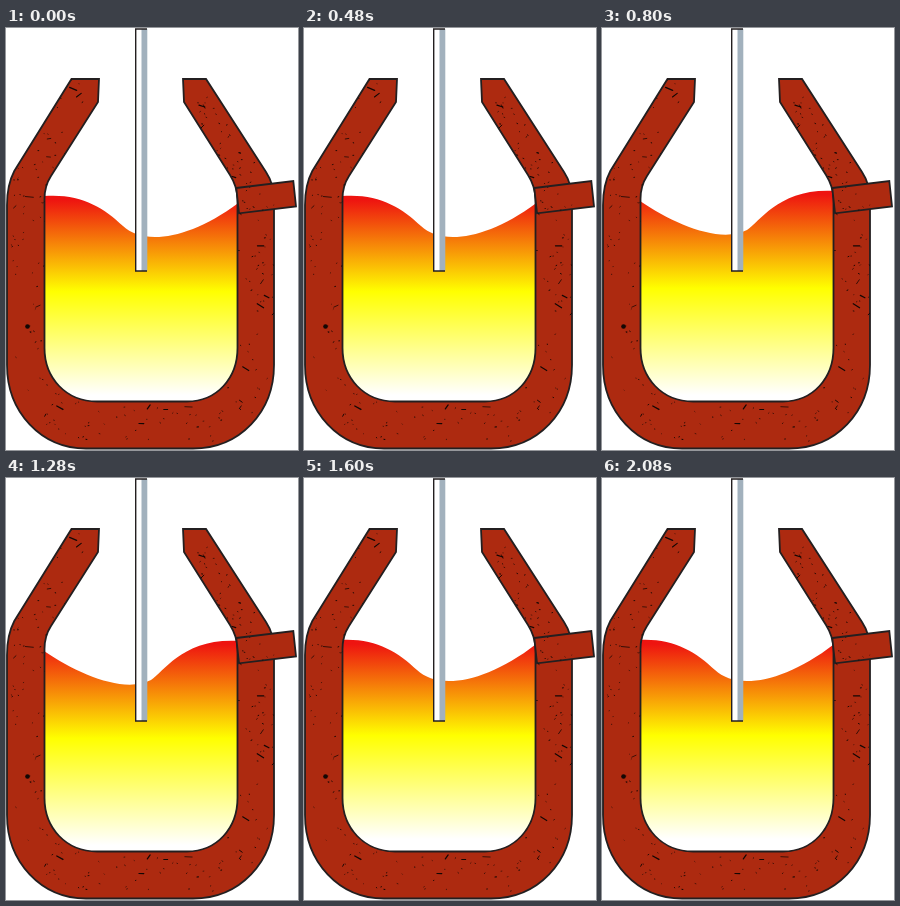
An HTML page that plays this animation: 292x422 px, repeating every 2400 ms.

```html
<!DOCTYPE html>
<html lang="en">
<head>
<meta charset="utf-8">
<title>Converter vessel</title>
<style>
  html, body { margin: 0; width: 100%; height: 100%; overflow: hidden; background: #fff; }
  svg { display: block; width: 100%; height: 100%; }
  .melt { visibility: hidden; animation: show 2400ms step-end infinite; }
  .melt:nth-child(2) { animation-delay: -1600ms; }
  .melt:nth-child(3) { animation-delay: -800ms; }
  @keyframes show {
    0% { visibility: visible; }
    33.3333%, 100% { visibility: hidden; }
  }
  .wall { fill: #ad2a10; stroke: #231f20; stroke-width: 1.8; }
  .grit { fill: none; stroke: #130704; stroke-linecap: round; }
</style>
</head>
<body>
<svg viewBox="0 0 292 422">
  <defs>
    <linearGradient id="heat" gradientUnits="userSpaceOnUse" x1="0" y1="168" x2="0" y2="367">
      <stop offset=".02" stop-color="#ee1410"/>
      <stop offset=".48" stop-color="#ff0"/>
      <stop offset="1" stop-color="#fff"/>
    </linearGradient>
    <linearGradient id="heatRight" href="#heat" y1="162"/>
    <path id="wave" fill="url(#heat)" d="M33 168.500C72 164 96 178 117 198S186 212 240 169V390H33Z"/>
    <path id="shell" d="M65.500 51H93L92 74L45 148Q38.500 158 38.500 171V320C38.500 350 60 373.500 91 373.500H181C211 373.500 231.500 350 231.500 320V171Q231 158 224 147L178 74L177 51H200L260 144Q268 156 268 172V337C268 384 234 420.500 187 420.500H80C35 420.500 1 384 1 337V177Q1 157 8.300 143Z"/>
    <path id="spout" d="M230.300 160L287.300 153L290 178.500L233 185.300Z"/>
    <clipPath id="bricks"><use href="#shell"/><use href="#spout"/></clipPath>
    <clipPath id="cavity"><path d="M38 100H232V320C232 350 211 374 181 374H91C60 374 38 350 38 320Z"/></clipPath>
    <path id="core" d="M80 55L23 155V332Q28 397 90 397H180Q250 395 250 335V155L188 55"/>
  </defs>

  <g clip-path="url(#cavity)">
    <use class="melt" href="#wave"/>
    <path class="melt" fill="url(#heatRight)" d="M38 173C72 196 118 216 145 202C158 194 177 160 232 163V390H38Z"/>
    <use class="melt" href="#wave" transform="translate(-4 -6)"/>
  </g>

  <use href="#shell" class="wall"/>
  <use href="#spout" class="wall"/>
  <g id="specks" class="grit" clip-path="url(#bricks)"></g>
  <circle cx="21.500" cy="298.500" r="2.300" fill="#130704"/>

  <path fill="#fff" d="M129.500 1H136V243H129.500Z"/>
  <path fill="#a2b1bd" d="M135.500 1H141.300V243H135.500Z"/>
  <path fill="none" stroke="#231f20" stroke-width="1.400" d="M141 1H129.700V243H141"/>
</svg>
<script>
  const layer = document.getElementById('specks');
  const core = document.getElementById('core');
  const coreLength = core.getTotalLength();

  let seed = 17;
  const rnd = () => (seed = seed * 16807 % 2147483647) / 2147483647;
  const spread = r => (rnd() * 2 - 1) * r;

  // Scatter short strokes inside the brickwork, along its centre line
  function scatter(count, length, width) {
    for (let i = 0; i < count; i++) {
      const { x, y } = core.getPointAtLength(rnd() * coreLength);
      const p = document.createElementNS('http://www.w3.org/2000/svg', 'path');
      p.setAttribute('d', `M${x + spread(18)} ${y + spread(20)}l${spread(length)} ${spread(length / 2)}`);
      p.setAttribute('stroke-width', width * (0.5 + rnd() / 2));
      layer.append(p);
    }
  }

  scatter(28, 8, 1.4);
  scatter(200, 1, 1);
</script>
</body>
</html>
```
